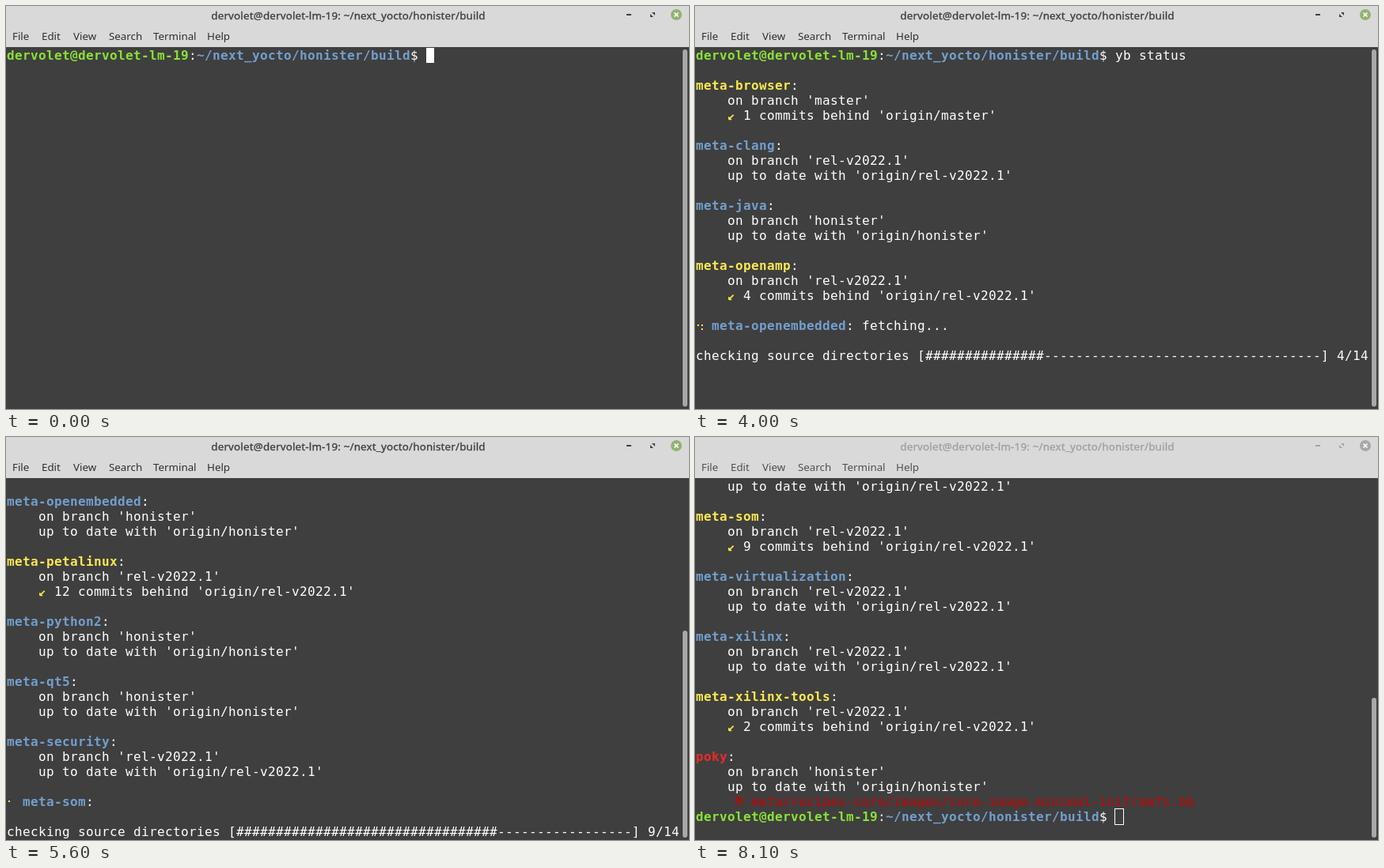
Write an HTML page that moves like this. It is 863x510 px and loops after 9200 ms.

```html
<!DOCTYPE html>
<html lang="en">
<head>
<meta charset="utf-8">
<title>Terminal</title>
<style>
  html, body { margin: 0; width: 100%; height: 100%; overflow: hidden; background: #3f3f3f; }
  #stage { position: relative; width: 863px; height: 510px; overflow: hidden; }
  #bar {
    position: absolute; inset: 0 0 auto; height: 52px; background: #d9d9d9; color: #303030;
    font: 13.33px/20px "Noto Sans", "Open Sans", sans-serif;
  }
  #title {
    position: absolute; top: 2px; width: 865px; text-align: center; white-space: pre;
    letter-spacing: .2px; color: #404040; -webkit-text-stroke: .35px;
  }
  #bar span { position: absolute; top: 28px; }
  #bar svg { position: absolute; left: 780px; top: 0; fill: #404040; }
  #close { fill: #92b372; }
  .blur #bar { color: #505050; }
  .blur #title { color: #a0a0a0; }
  .blur #bar svg { fill: #a4a4a4; }
  .blur #close { fill: #a8a8a8; }
  #term {
    position: absolute; left: 1px; top: 53px; width: 853px; height: 457px; overflow: hidden;
    font: 16px/19px "DejaVu Sans Mono", monospace; letter-spacing: calc(10px - 1ch);
    color: #fff; white-space: pre;
  }
  #term div { height: 19px; }
  b { font-weight: 700; }
  .green { color: #8ae234; }
  .blue { color: #729fcf; }
  .yellow { color: #fce94f; }
  .red { color: #ef2929; }
  .dark { color: #c00; }
  #cursor { position: absolute; width: 10px; height: 19px; background: #fff; }
  .blur #cursor { background: none; outline: 1px solid #fff; }
  #spin { position: absolute; left: 0; top: 0; width: 2px; height: 2px; }
  #thumb { position: absolute; left: 855px; width: 6px; border-radius: 3px; background: #a8a8a8; }
</style>
</head>
<body>
<div id="stage">
  <div id="bar">
    <div id="title">dervolet@dervolet-lm-19: ~/next_yocto/honister/build</div>
    <svg width="83" height="24">
      <rect x="4" y="10" width="6" height="2"/>
      <path d="M36 8h4v4zM34 10v4h4z"/>
      <circle id="close" cx="67" cy="11" r="7"/>
      <path d="M64.5 8.5l5 5m0-5l-5 5" stroke="#fff" stroke-width="1.7"/>
    </svg>
    <span style="left:8px">File</span>
    <span style="left:45px">Edit</span>
    <span style="left:85px">View</span>
    <span style="left:130px">Search</span>
    <span style="left:186px">Terminal</span>
    <span style="left:254px">Help</span>
  </div>
  <div id="term"><div id="text"></div><i id="cursor"></i><i id="spin"></i></div>
  <div id="thumb"></div>
</div>
<script>
const LOOP = 9200, ROWS = 24, LINE = 19, COLS = 85, PROMPT_COLS = 53;
const RUN = 2300, DONE = 7200, BLUR = 8100;
const $ = id => document.getElementById(id);
const bold = (color, text) => `<b class="${color}">${text}</b>`;
const PROMPT = bold('green', 'dervolet@dervolet-lm-19') + ':' +
  bold('blue', '~/next_yocto/honister/build') + '$ ';

// name, branch, commits behind, start time
const REL = 'rel-v2022.1', HON = 'honister';
const LAYERS = [
  ['meta-browser', 'master', 1, RUN],
  ['meta-clang', REL, 0, 2600],
  ['meta-java', HON, 0, 3000],
  ['meta-openamp', REL, 4, 3400],
  ['meta-openembedded', HON, 0, 3800],
  ['meta-petalinux', REL, 12, 4200],
  ['meta-python2', HON, 0, 4600],
  ['meta-qt5', HON, 0, 5000],
  ['meta-security', REL, 0, 5300],
  ['meta-som', REL, 9, 5600],
  ['meta-virtualization', REL, 0, 5900],
  ['meta-xilinx', REL, 0, 6100],
  ['meta-xilinx-tools', REL, 2, 6400],
  ['poky', HON, 0, 6600]
];

// [time, characters typed]
const TYPED = [[900, 1], [1100, 2], [1300, 3], [1500, 4], [1700, 5], [1800, 6], [1900, 7], [2100, 9]];
const COMMAND = 'yb status';

const SPINNER = '⠁⠁⠉⠙⠚⠒⠂⠂⠒⠲⠴⠤⠄⠄⠤⠠⠠⠤⠦⠖⠒⠐⠐⠒⠓⠋⠉⠈⠈';
// [time, spinner step], linear in between
const SPIN_KEYS = [[2300, 0], [2700, 1], [4000, 9], [5000, 23], [5600, 35], [6700, 61], [7200, 72]];

function spinGlyph(t) {
  const i = SPIN_KEYS.findLastIndex(key => key[0] <= t);
  const [t0, a] = SPIN_KEYS[i], [t1, b] = SPIN_KEYS[i + 1];
  return SPINNER[Math.floor(a + (b - a) * (t - t0) / (t1 - t0)) % SPINNER.length];
}

// Braille bits 0-2 are the left column, 3-5 the right one
function spinDots(glyph) {
  const bits = glyph.charCodeAt(0) - 0x2800;
  return [0, 1, 2, 3, 4, 5].filter(n => bits >> n & 1)
    .map(n => `${n < 3 ? 2 : 7}px ${[4, 8, 13][n % 3]}px #fce94f`).join();
}

function progress(k) {
  const head = 'checking source directories [', tail = `] ${k}/${LAYERS.length}`;
  const width = COLS - head.length - tail.length;
  const full = Math.floor(k / LAYERS.length * width) + 1;
  return head + '#'.repeat(full).padEnd(width, '-') + tail;
}

function report([name, branch, behind]) {
  const color = name === 'poky' ? 'red' : behind ? 'yellow' : 'blue';
  return [
    bold(color, name) + ':',
    `    on branch '${branch}'`,
    behind ? `    ${bold('yellow', '↙')} ${behind} commits behind 'origin/${branch}'`
           : `    up to date with 'origin/${branch}'`
  ];
}

function draw(t) {
  const typed = TYPED.findLast(key => key[0] <= t)?.[1] ?? 0;
  const lines = [PROMPT + COMMAND.slice(0, typed)];
  let cursor = null, spinLine = -1;

  if (t < RUN) {
    if (t < 600 || t >= 900) cursor = [PROMPT_COLS + typed, 0];
  } else {
    const k = t < DONE ? LAYERS.findLastIndex(layer => layer[3] <= t) : LAYERS.length;
    LAYERS.slice(0, k).forEach(layer => lines.push('', ...report(layer)));
    if (t < DONE) {
      const [name, , , start] = LAYERS[k];
      spinLine = lines.length + 1;
      lines.push('', `  ${bold('blue', name)}:${t >= start + 100 ? ' fetching...' : ''}`, '', progress(k));
    } else {
      lines.push('<span class="dark">     M meta/recipes-core/images/core-image-minimal-initramfs.bb</span>', PROMPT, '');
      if (t < 7800 || t >= BLUR) cursor = [PROMPT_COLS, lines.length - 2];
    }
  }

  const scroll = Math.max(0, lines.length - ROWS);
  $('text').innerHTML = lines.slice(scroll).map(line => `<div>${line}</div>`).join('');

  $('cursor').hidden = !cursor;
  $('cursor').style.display = cursor ? 'block' : 'none';
  if (cursor) {
    $('cursor').style.left = cursor[0] * 10 + 'px';
    $('cursor').style.top = (cursor[1] - scroll) * LINE + 'px';
  }

  $('spin').style.top = (spinLine - scroll) * LINE + 'px';
  $('spin').style.boxShadow = spinLine < 0 ? 'none' : spinDots(spinGlyph(t));

  const top = 55 + 458 * scroll / (scroll + ROWS);
  $('thumb').style.top = top + 'px';
  $('thumb').style.height = 507 - top + 'px';
  $('stage').className = t >= BLUR ? 'blur' : '';
}

let shown = -1;
const begin = performance.now();
function tick() {
  const t = Math.floor((performance.now() - begin) % LOOP / 100) * 100;
  if (t !== shown) draw(shown = t);
  requestAnimationFrame(tick);
}
tick();
</script>
</body>
</html>
```
